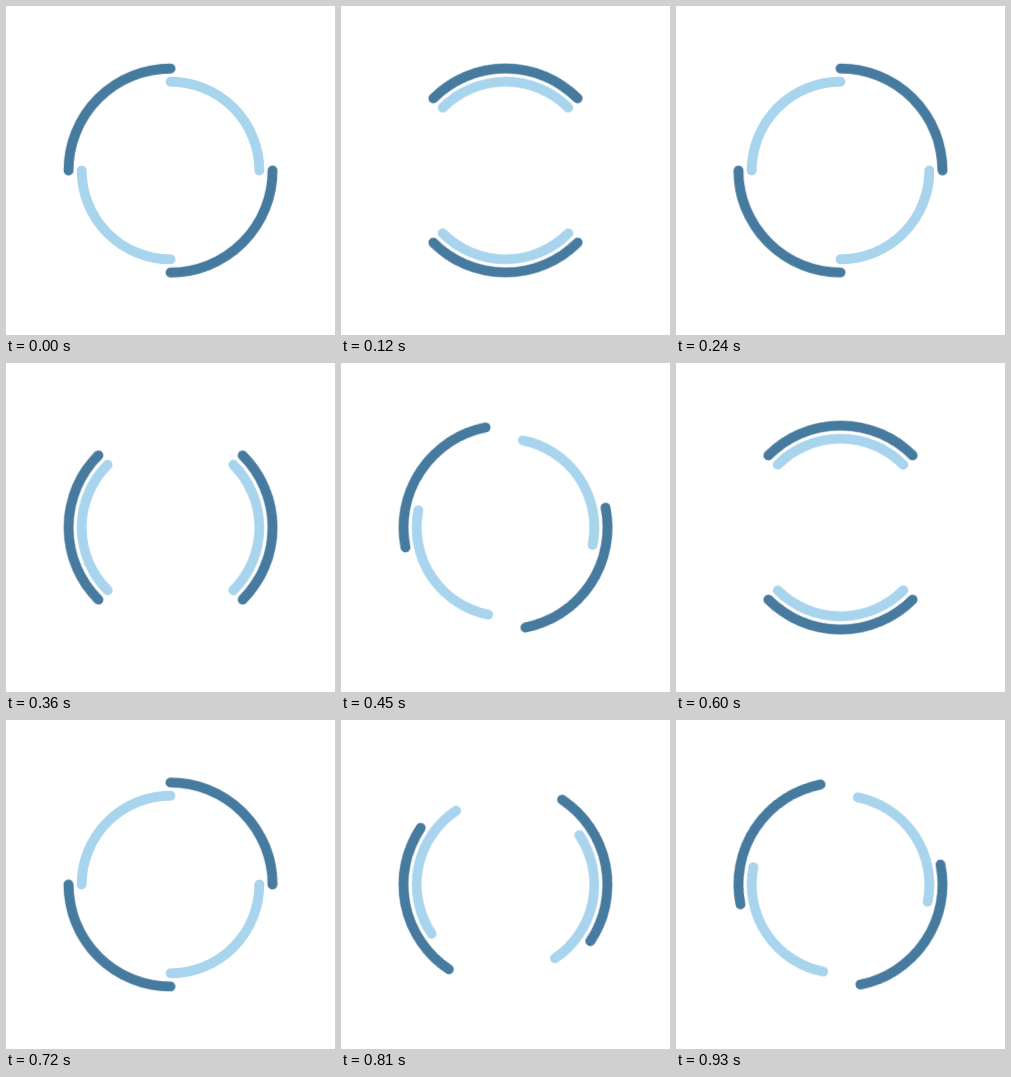
An HTML page for the animation above (960 ms loop, 329 px wide and 329 px high).

```html
<!DOCTYPE html>
<html lang="en">
<head>
<meta charset="utf-8">
<title>Double ring spinner</title>
<style>
  html, body { margin: 0; width: 100%; height: 100%; overflow: hidden; background: #fff; }
  svg { display: block; width: 100vw; height: 100vh; }
  path { fill: none; stroke-width: 3; stroke-linecap: round; }
  .outer { stroke: #467a9e; }
  .inner { stroke: #a8d4ed; }
</style>
</head>
<body>
<svg viewBox="-50 -50 100 100">
  <path class="outer" d="M-31 0A31 31 0 0 1 0-31M31 0A31 31 0 0 1 0 31"/>
  <path class="inner" d="M0-27A27 27 0 0 1 27 0M0 27A27 27 0 0 1-27 0"/>
</svg>
<script>
  const LOOP = 960, STEPS = 32;

  function spin(selector, turn) {
    document.querySelector(selector).animate(
      [{ transform: 'rotate(0deg)' }, { transform: `rotate(${turn}deg)` }],
      { duration: LOOP, iterations: Infinity, easing: `steps(${STEPS}, end)` }
    );
  }

  spin('.outer', 360);
  spin('.inner', -360);
</script>
</body>
</html>
```
